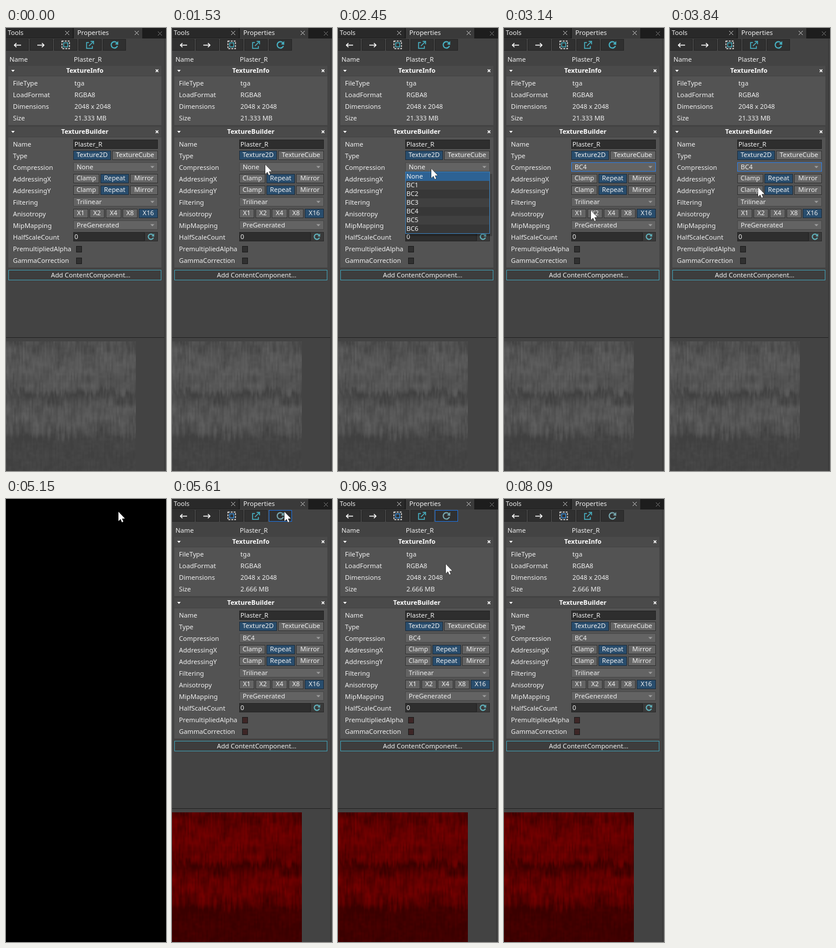
An HTML page with a canvas that plays this animation: 276x762 px, repeating every 8170 ms.

```html
<!DOCTYPE html>
<html lang="en">
<head>
<meta charset="utf-8">
<title>Texture properties</title>
<style>
  html, body { margin: 0; width: 276px; height: 762px; overflow: hidden; background: #434343; }
  canvas { display: block; }
</style>
</head>
<body>
<canvas id="stage" width="276" height="762"></canvas>
<script>
const LOOP = 8170, STEP = 76.7;
const c = document.getElementById('stage').getContext('2d');
const FORMATS = ['None', 'BC1', 'BC2', 'BC3', 'BC4', 'BC5', 'BC6'];
const CYAN = '#48b4c6', FOCUS = '#1d6fd8';

// Cursor moves: start time, number of steps, points passed at an even pace
const MOVES = [
  [380, 10, [[124, 727], [140, 610], [165, 440], [182, 270], [184, 214], [172, 228], [164, 235]]],
  [1530, 1, [[161, 235]]],
  [2450, 5, [[161, 242], [157, 270], [150, 314]]],
  [3840, 10, [[152, 274], [165, 200], [190, 110], [209, 45], [207, 28], [194, 22]]],
  [6850, 7, [[192, 44], [180, 180], [160, 470], [138, 762]]]
];

const clamp = (v, a, b) => Math.min(b, Math.max(a, v));
const mix = (a, b, u) => a + (b - a) * u;

function cursorAt(t) {
  if (t >= 7310) return null;
  const move = MOVES.filter(m => t >= m[0]).pop();
  if (!move) return null;
  const [start, steps, pts] = move;
  const k = Math.min(steps - 1, Math.floor((t - start) / STEP + 0.05));
  const p = steps > 1 ? k / (steps - 1) * (pts.length - 1) : 0;
  const i = Math.floor(p), a = pts[i], b = pts[i + 1] || a;
  return [0, 1].map(n => Math.round(mix(a[n], b[n], p - i)));
}

// Plaster texture from value noise
function hash(x, y) {
  const s = Math.sin(x * 127.1 + y * 311.7) * 43758.5453;
  return s - Math.floor(s);
}

function noise(x, y) {
  const i = Math.floor(x), j = Math.floor(y);
  const ease = f => f * f * (3 - 2 * f), u = ease(x - i), v = ease(y - j);
  return mix(mix(hash(i, j), hash(i + 1, j), u), mix(hash(i, j + 1), hash(i + 1, j + 1), u), v);
}

const PROFILE = [[-30, .4], [8, .45], [25, .68], [55, .72], [82, .62], [91, .2], [100, .36],
  [114, .7], [138, .66], [153, .5], [168, .12], [260, .08]];

function profile(y) {
  const i = clamp(PROFILE.findIndex(p => p[0] > y), 1, PROFILE.length - 1);
  const a = PROFILE[i - 1], b = PROFILE[i];
  return mix(a[1], b[1], (y - a[0]) / (b[0] - a[0]));
}

function plaster(colour) {
  const cv = document.createElement('canvas');
  cv.width = 224; cv.height = 223;
  const g = cv.getContext('2d'), img = g.createImageData(224, 223);
  for (let y = 0; y < 223; y++) for (let x = 0; x < 224; x++) {
    const jag = (noise(x / 3, 7) - .5) * 14 + (noise(x / 14, 3) - .5) * 12;
    const base = profile(y + jag);
    const streak = noise(x / 2.5, y / 15 + 40) - .5;
    const patch = noise(x / 18 + 9, y / 13) - .5;
    const speck = noise(x / 6 + 70, y / 4) - .5;
    const wall = clamp(base * 4, 0, 1);
    const l = clamp(base + wall * (streak * .45 + patch * .45) + speck * .16, 0, 1);
    img.data.set([...colour(l), 255], (y * 224 + x) * 4);
  }
  g.putImageData(img, 0, 0);
  return cv;
}

const GREY = plaster(l => [64 + 30 * l, 64 + 30 * l, 64 + 30 * l]);
const RED = plaster(l => [58 + 58 * l, 0, 0]);

// Drawing helpers
function box(x, y, w, h, fill, edge) {
  c.fillStyle = fill;
  c.fillRect(x, y, w, h);
  if (edge) {
    c.strokeStyle = edge;
    c.lineWidth = 1;
    c.strokeRect(x + .5, y + .5, w - 1, h - 1);
  }
}

function text(s, x, mid, { bold = false, align = 'left', colour = '#f0f0f0' } = {}) {
  c.font = `${bold ? 'bold 11px' : '11.2px'} "Noto Sans", "Open Sans", sans-serif`;
  c.textAlign = align;
  c.fillStyle = colour;
  c.fillText(s, x, mid + 4);
}

function line(colour, width, ...pts) {
  c.strokeStyle = colour;
  c.lineWidth = width;
  c.beginPath();
  pts.forEach(p => c.lineTo(...p));
  c.stroke();
}

function shape(colour, ...pts) {
  c.fillStyle = colour;
  c.beginPath();
  pts.forEach(p => c.lineTo(...p));
  c.closePath();
  c.fill();
}

function cross(x, y, r, colour, width = 1) {
  line(colour, width, [x - r, y - r], [x + r, y + r]);
  line(colour, width, [x - r, y + r], [x + r, y - r]);
}

function reloadIcon(x, y, r, colour) {
  c.strokeStyle = colour;
  c.lineWidth = 2;
  c.beginPath();
  c.arc(x, y, r, .35, 5.5);
  c.stroke();
  shape(colour, [x + r + 1, y - r - 1], [x + r + 1, y], [x + 1, y - 1]);
}

function arrowIcon(x, dir) {
  line('#fff', 1.5, [x - 6, 29.5], [x + 6, 29.5]);
  line('#fff', 1.5, [x + dir * 2, 26], [x + dir * 5.5, 29.5], [x + dir * 2, 33]);
}

function toolbar(t, cursor) {
  box(0, 0, 276, 18, '#1d1d1d');
  box(0, 0, 115, 17, '#292929');
  box(117, 0, 118, 18, '#3a3a3a');
  text('Tools', 3, 8);
  text('Properties', 123, 8);
  cross(105.5, 8.5, 3.5, '#c8c8c8');
  cross(225.5, 8.5, 3.5, '#c8c8c8');
  cross(265.5, 9.5, 3.5, '#777');

  const over = cursor && cursor[0] >= 167 && cursor[0] < 207 && cursor[1] >= 19 && cursor[1] < 39;
  const focused = t >= 4920 && t < 8090;
  for (let i = 0; i < 5; i++) {
    const last = i === 4;
    box(i * 42 - 1, 19, 40, 20, last && over && t < 5610 ? '#202020' : '#303030',
      last && focused ? FOCUS : '#262626');
  }
  arrowIcon(20, -1);
  arrowIcon(60, 1);
  c.setLineDash([3, 2]);
  c.strokeStyle = '#fff';
  c.lineWidth = 1.4;
  c.strokeRect(96.5, 22.5, 13, 13);
  c.setLineDash([]);
  c.strokeStyle = t >= 5610 ? '#3a8fdc' : CYAN;
  c.strokeRect(99.5, 25.5, 7, 7);
  line(CYAN, 1.5, [143, 25], [139, 25], [139, 35], [149, 35], [149, 31]);
  line(CYAN, 1.5, [143, 31], [151, 23]);
  line(CYAN, 1.5, [146, 23], [151, 23], [151, 28]);
  reloadIcon(187, 29, 5.5, t >= 5610 ? '#78a9b0' : CYAN);
}

function panel(title, y, h) {
  box(4, y, 264, h, '#535353');
  box(4, y, 264, 17, '#4a4a4a');
  box(4, y + 17, 264, 1, '#434343');
  shape('#fff', [9, y + 7], [15, y + 7], [12, y + 10.5]);
  text(title, 136, y + 8, { bold: true, align: 'center', colour: '#fff' });
  cross(260.5, y + 8.5, 2.2, '#fff', 1.5);
}

function combo(value, y, focused) {
  box(116, y, 146, 16, '#636363', focused ? '#2f7de0' : '#484848');
  text(value, 122, y + 8);
  shape('#a0a0a0', [249, y + 6.5], [256, y + 6.5], [252.5, y + 10]);
}

function toggles(y, on, ...items) {
  items.forEach(([label, x, right], i) => {
    box(x, y, right - x, 16, i === on ? '#294d6d' : '#656565', i === on ? '#1c2d3d' : '#333');
    text(label, (x + right) / 2, y + 7, { align: 'center' });
  });
}

function dropdown(cursor) {
  c.fillStyle = 'rgba(0,0,0,.22)';
  c.fillRect(120, 251, 146, 107);
  box(116, 247, 146, 107, '#383838');
  const hot = clamp(Math.floor((cursor[1] - 248) / 15), 0, 6);
  FORMATS.forEach((name, i) => {
    box(117, 248 + i * 15, 144, 15, i === hot ? '#2d6294' : i % 2 ? '#404040' : '#373737');
    text(name, 118, 255 + i * 15);
  });
  c.strokeStyle = '#3b7fb8';
  c.lineWidth = 1;
  c.strokeRect(116.5, 247.5, 145, 106);
}

function properties(t) {
  const reloaded = t >= 5610;
  text('Name', 6, 54);
  text('Plaster_R', 117, 54);

  panel('TextureInfo', 65, 102);
  [['FileType', 'tga'], ['LoadFormat', 'RGBA8'], ['Dimensions', '2048 x 2048'],
    ['Size', reloaded ? '2.666 MB' : '21.333 MB']].forEach(([label, value], i) => {
    text(label, 12, 95 + i * 20);
    text(value, 118, 95 + i * 20);
  });

  panel('TextureBuilder', 170, 242);
  ['Name', 'Type', 'Compression', 'AddressingX', 'AddressingY', 'Filtering', 'Anisotropy',
    'MipMapping', 'HalfScaleCount', 'PremultipliedAlpha', 'GammaCorrection']
    .forEach((label, i) => text(label, 12, 200 + i * 20));

  box(116, 192, 146, 16, '#2e2e2e', '#252525');
  text('Plaster_R', 118, 200);
  toggles(211, 0, ['Texture2D', 116, 181], ['TextureCube', 183, 262]);
  combo(t < 3140 ? 'None' : 'BC4', 231, t >= 3140 && t < 4920);
  for (const y of [251, 271])
    toggles(y, 1, ['Clamp', 116, 161], ['Repeat', 163, 212], ['Mirror', 214, 262]);
  combo('Trilinear', 291);
  toggles(311, 4, ['X1', 116, 142], ['X2', 144, 170], ['X4', 172, 199], ['X8', 201, 227], ['X16', 229, 262]);
  combo('PreGenerated', 331);
  box(116, 351, 123, 16, '#2e2e2e', '#252525');
  text('0', 118, 359);
  box(239, 351, 23, 16, '#3a3a3a', '#2c2c2c');
  reloadIcon(250, 359, 4.5, '#62b3bd');
  for (const y of [375, 395])
    box(121, y, 10, 11, reloaded ? '#3d2626' : '#303030', '#1c1c1c');

  box(4, 416, 264, 18, '#3d3d3d', '#419cb0');
  text('Add ContentComponent...', 146, 425, { align: 'center' });
  box(0, 532, 273, 1, '#222');
  c.drawImage(reloaded ? RED : GREY, 0, 539);
}

function tooltip() {
  box(139, 47, 97, 28, '#24526f', '#3d7ea6');
  shape('#3d7ea6', [181, 48], [187.5, 40], [194, 48]);
  shape('#24526f', [182, 48.5], [187.5, 41.5], [193, 48.5]);
  text('Reload Content', 187.5, 60, { align: 'center' });
}

function pointer([x, y]) {
  c.save();
  c.translate(x, y);
  const outline = [[0, 0], [0, 16], [3.7, 12.6], [6, 18], [8.4, 17], [6.1, 11.8], [11, 11.4], [0, 0]];
  line('#111', 1, ...outline);
  shape('#fff', ...outline);
  c.restore();
}

function draw(t) {
  const cursor = cursorAt(t);
  if (t >= 5150 && t < 5610) {
    box(0, 0, 276, 762, '#000');
  } else {
    box(0, 0, 276, 762, '#434343');
    box(273, 18, 1, 744, '#363636');
    toolbar(t, cursor);
    properties(t);
    if (t >= 1915 && t < 3140) dropdown(cursor);
    if (t >= 4690 && t < 5150) tooltip();
  }
  if (cursor) pointer(cursor);
}

const begin = performance.now();
function tick() {
  draw((performance.now() - begin) % LOOP);
  requestAnimationFrame(tick);
}
tick();
</script>
</body>
</html>
```
